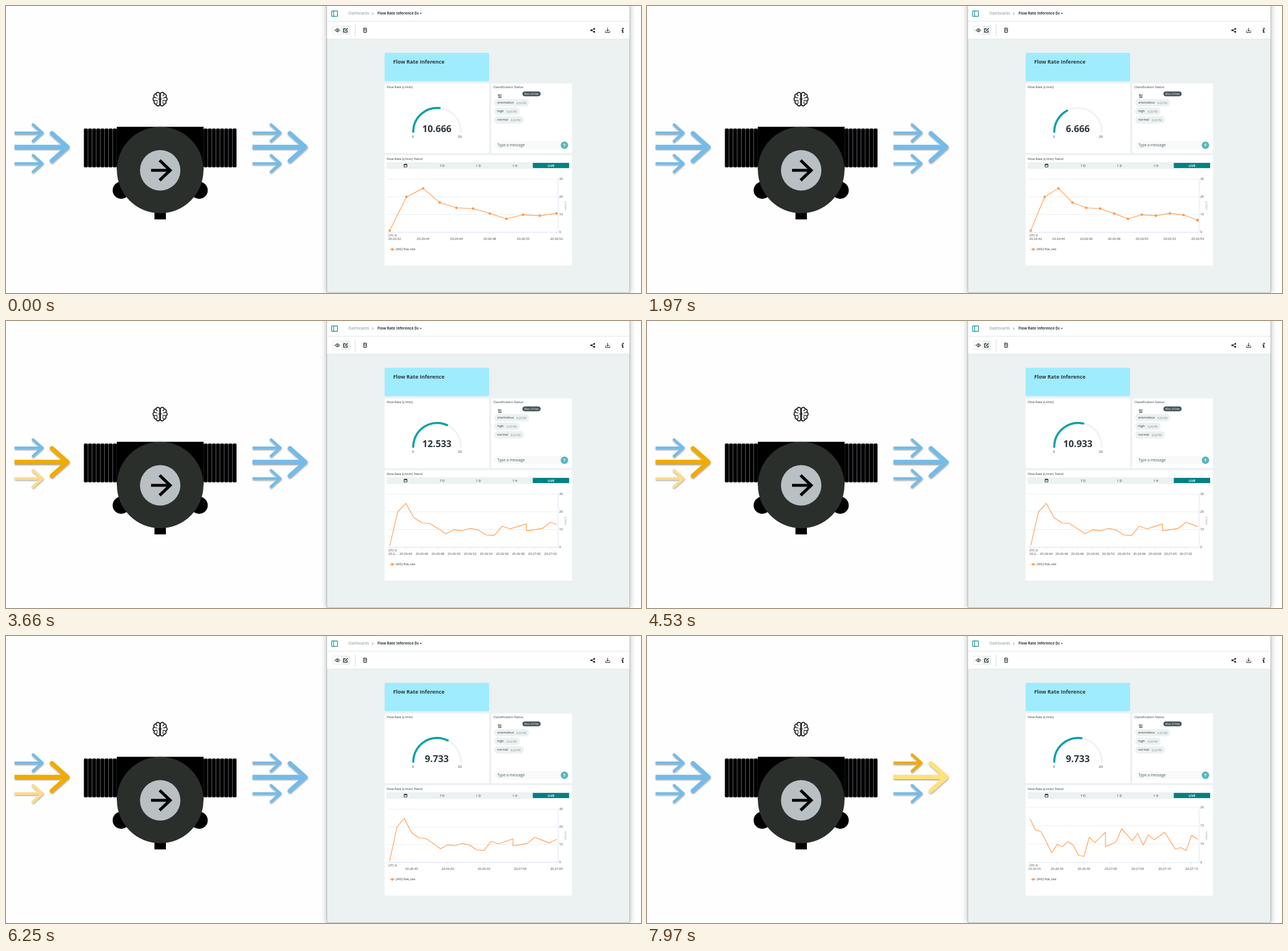
An HTML page for the animation above (8 s loop, 1112 px wide and 503 px high).

```html
<!DOCTYPE html>
<html lang="en">
<head>
<meta charset="utf-8">
<title>Flow rate dashboard</title>
<style>
html, body { margin: 0; width: 100%; height: 100%; overflow: hidden; background: #fefefe; }
svg { display: block; width: 100vw; height: 100vh; }
text { font-family: "Open Sans", "Noto Sans", sans-serif; font-size: 5.7px; fill: #2c353a; }
.line { fill: none; stroke: #111; stroke-linecap: round; stroke-linejoin: round; }
.mid { text-anchor: middle; }
.bold { font-weight: 700; }
.tick { font-size: 5.6px; fill: #444; }
.time { font-size: 4.6px; fill: #7f8c8d; }
</style>
</head>
<body>
<svg viewBox="0 0 1112 503" preserveAspectRatio="none">
  <defs>
    <filter id="soft" x="-20%" y="-20%" width="140%" height="150%">
      <feDropShadow dx="0.4" dy="1.6" stdDeviation="0.9" flood-color="#000" flood-opacity="0.4"/>
    </filter>
    <filter id="glow" x="-10%" y="-10%" width="120%" height="120%">
      <feGaussianBlur stdDeviation="6"/>
    </filter>
    <clipPath id="crumb"><rect x="650" y="6" width="72.3" height="16"/></clipPath>
    <clipPath id="plot"><rect x="668" y="296" width="299.5" height="104"/></clipPath>
  </defs>
  <rect width="1112" height="503" fill="#fefefe"/>

  <g id="flowIn"></g>
  <g id="flowOut" transform="translate(416.7 0)"></g>

  <!-- meter -->
  <g id="fins" stroke="#70757a" stroke-width="0.5"></g>
  <rect x="194" y="211.7" width="152" height="76"/>
  <circle cx="201.7" cy="323" r="15"/>
  <circle cx="338.3" cy="323" r="15"/>
  <rect x="260" y="360" width="20" height="14"/>
  <circle cx="270" cy="287.5" r="75.8" fill="#2b2f2c"/>
  <circle cx="270" cy="288" r="35.4" fill="#b8c0c4"/>
  <path d="M254 288H287M269 270.3L287.5 288L269 305.5" fill="none" stroke="#000" stroke-width="5.2"/>

  <!-- brain -->
  <g class="line" stroke-width="1.7">
    <path id="lobe" d="M269.3 153.5C268 150.5 263.4 150.6 262.8 154.2C259.4 154 258 157.2 259.5 159.5C256.6 161.2 256.8 165.4 259.6 166.6C258.4 169.6 260.2 172 262.8 172C263.6 175.6 268 176.3 269.3 173.2Z"/>
    <use href="#lobe" transform="matrix(-1 0 0 1 539.6 0)"/>
    <path stroke-width="1.2" d="M262.8 154.2Q263 157 265.4 157.5M259.5 159.5Q261.5 161.5 264.5 161M259.6 166.6Q262 164.2 264.5 165.5V168M262.8 172Q263.5 169.5 266 169.8M276.8 154.2Q276.6 157 274.2 157.5M280 159.5Q278 161.5 275 161M280 166.6Q277.5 164.2 275 165.5V168M276.8 172Q276 169.5 273.6 169.8M266.5 163H273"/>
  </g>

  <!-- window -->
  <rect x="562" y="-20" width="530" height="525" rx="5" fill="#000" opacity="0.3" filter="url(#glow)"/>
  <rect x="561.8" y="-10" width="530.4" height="512.7" rx="3" fill="#ecf1f1" stroke="#a9b0b2" stroke-width="0.9"/>
  <path d="M562.3 0H1091.7V58H562.3Z" fill="#fff"/>
  <path d="M562.3 26.7H1091.7M562.3 58H1091.7" stroke="#d8dddd" stroke-width="0.8"/>
  <g fill="none" stroke="#0a8f94" stroke-width="1.2">
    <rect x="570.3" y="8.6" width="10.2" height="9.6" rx="0.8"/><path d="M573.7 8.6V18.2"/>
  </g>
  <text x="599.8" y="15.3" style="font-size:6.4px;fill:#7f8c8d">Dashboards</text>
  <path class="line" d="M641.2 11.4L643.2 13.3L641.2 15.2" style="stroke:#6f7b7d" stroke-width="0.8"/>
  <g clip-path="url(#crumb)"><text class="bold" x="650.6" y="15.3" style="font-size:6.4px">Flow Rate Inference Dash</text></g>
  <path d="M724.6 12.3H728.2L726.4 14.3Z" fill="#2c353a"/>

  <!-- toolbar -->
  <rect x="572.3" y="35" width="29.7" height="15" rx="1.5" fill="#ecf1f1" stroke="#dfe5e5" stroke-width="0.7"/>
  <rect x="573" y="35.6" width="14.4" height="13.8" rx="1" fill="#fff"/>
  <g class="line" stroke-width="1">
    <path d="M576.2 42.6Q580.4 36.8 584.7 42.6Q580.4 48.3 576.2 42.6Z"/>
    <circle cx="580.4" cy="42.6" r="1.3"/>
    <path d="M594.3 39.8H591.2V46H597.3V43.2M594 43.4L597.8 39.5" stroke-width="1.2"/>
    <rect x="626.4" y="38.8" width="5" height="7.6" rx="0.5"/>
    <path d="M628 40.8H630M628 42.6H630M628.7 44.6H629.2" stroke-width="0.8"/>
    <path d="M1030 40.2L1025.2 42.6L1030 45.2"/>
    <path d="M1053.6 38.7V44M1051.3 42L1053.6 44.3L1055.9 42M1050 44V46.6H1057.2V44" stroke-width="0.9"/>
    <path d="M1078.4 42.2H1080.2L1079.4 46H1081" stroke-width="1.5"/>
  </g>
  <path d="M611.5 32V53.5" stroke="#cfd6d6" stroke-width="0.8"/>
  <g fill="#111">
    <circle cx="1030.1" cy="40.1" r="1.5"/><circle cx="1024.9" cy="42.6" r="1.5"/><circle cx="1030.1" cy="45.3" r="1.5"/>
    <circle cx="1080.5" cy="39.5" r="1.2"/>
  </g>

  <!-- cards -->
  <rect x="663" y="82" width="183" height="49.8" rx="2" fill="#9fecff"/>
  <text class="bold" x="678" y="101.2" style="font-size:9.1px">Flow Rate Inference</text>
  <g fill="#fff">
    <rect x="663" y="135.8" width="183" height="122" rx="1.5"/>
    <rect x="849.8" y="135.8" width="141.4" height="122" rx="1.5"/>
    <rect x="663" y="261.5" width="328.2" height="193.5" rx="1.5"/>
  </g>
  <text x="666.7" y="143.9">Flow Rate (L/min)</text>
  <text x="853.3" y="143.9">Classification Status</text>
  <text x="666.7" y="269.6">Flow Rate (L/min) Trend</text>

  <!-- gauge -->
  <g fill="none" stroke-width="3.7" stroke-linecap="round">
    <path d="M713.2 220.5A41.8 41.8 0 0 1 796.8 220.5" stroke="#f2f3f4"/>
    <path id="arc" stroke="#0ca1a6"/>
  </g>
  <text id="value" class="mid bold" x="754.5" y="220.8" style="font-size:16.3px"></text>
  <text class="mid" x="712.8" y="231.2" style="font-size:6px">0</text>
  <text class="mid" x="794.8" y="231.2" style="font-size:6px">20</text>

  <!-- chat -->
  <path class="line" d="M862.5 155.3H864.2V157.2H862.5ZM865.7 155.3H867.3M865.7 157.2H867.3M862.3 159H867.3M862.3 160.6H867.3" stroke-width="0.7"/>
  <rect x="904.3" y="149.8" width="32" height="8.4" rx="4.2" fill="#46545a"/>
  <text class="mid" x="920.2" y="155.7" style="font-size:4.6px;fill:#fff">Mon 24 Feb</text>
  <g id="chat"></g>
  <rect x="854.5" y="236.5" width="132.5" height="15" rx="7.5" fill="#f8fafa"/>
  <text x="860.7" y="246.3" style="font-size:6.45px;fill:#4e5b61">Type a message</text>
  <circle cx="977.9" cy="244" r="6.5" fill="#57b6ba"/>
  <path class="line" d="M977.9 246.5V241.8M975.9 243.6L977.9 241.6L979.9 243.6" style="stroke:#fff" stroke-width="0.9"/>

  <!-- range tabs -->
  <rect x="666.5" y="273.8" width="320.5" height="11.6" rx="1" fill="#ecf1f1"/>
  <rect x="922.5" y="275" width="63.6" height="9" rx="0.8" fill="#008184"/>
  <path class="line" d="M697.4 277.5H702.2V282.2H697.4ZM697.4 278.7H702.2M698.6 276.6V277.5M701 276.6V277.5" stroke-width="0.8"/>
  <text class="mid" x="763.6" y="281.7">7 D</text>
  <text class="mid" x="827.3" y="281.7">1 D</text>
  <text class="mid" x="890.9" y="281.7">1 H</text>
  <text class="mid bold" x="954.6" y="281.6" style="font-size:5.6px;fill:#fff">LIVE</text>

  <!-- chart -->
  <g id="chart"></g>
  <text class="tick" x="669.3" y="403.7" style="font-size:5.4px">UTC-6</text>
  <text class="mid" transform="translate(977.9 350) rotate(90)" style="fill:#999">L/min</text>
  <path d="M672.3 426.5H680.7" stroke="#ff9a49" stroke-width="1.1"/>
  <circle cx="676.5" cy="426.5" r="2.2" fill="#ff9a49"/>
  <text x="682.6" y="428.3" style="font-size:4.8px">[AVG] flow_rate</text>
</svg>
<script>
const LOOP = 8000, ANIM = 480, CUT_A = 2410, CUT_B = 7300;
const LEFT = 672, RIGHT = 964, ORANGE = '#ff9a49';
const BLUE = '#74bbe8', AMBER = '#f0ab00', SAND = '#fedc8a', LEMON = '#ffe27a';
const $ = id => document.getElementById(id);
const lerp = (a, b, p) => a + (b - a) * p;

// One reading per second from 20:26:42; second 59 was reported twice.
const readings = [0.933, 20, 24.8, 16.8, 13.8, 13.4, 10.6, 7.6, 9.9, 9.333, 10.666, 9.733,
  6.933, 6.666, 11.866, 10.4, 11.8, 13.2, 9.333, 9.9, 10.666, 14.133, 12.533, 10.933, 12.933,
  9.733, 12.533, 11.2, 12.133, 13.2, 10.933, 8.6, 9.066, 8.266, 12.4, 11.466, 9.733]
  .map((v, i) => ({ t: 42 + i - (i > 17), v }));
const valueAt = t => readings.filter(r => r.t === t).pop().v;

// shown from, animation start, second that arrives
const steps = [[0, -900, 52], [70, 70, 53], [1000, 1000, 54], [1970, 1970, 55],
  [CUT_A, 2370, 62], [3340, 3340, 63], [4290, 4290, 64], [5260, 5260, 65],
  [6250, 6250, 66], [7190, 7190, 67], [CUT_B, 7060, 76], [7870, 7870, 77]];

const clock = t => `20:${t < 60 ? 26 : 27}:${String(t % 60).padStart(2, '0')}`;
const xIn = (t, [lo, hi]) => LEFT + (t - lo) / (hi - lo) * (RIGHT - LEFT);

function arrow(tail, tip, y, reach, width, color) {
  return `<g filter="url(#soft)" fill="none" stroke="${color}" stroke-width="${width}">` +
    `<path d="M${tail} ${y}H${tip - 1}"/><path stroke-linecap="round" stroke-linejoin="round" ` +
    `d="M${tip - reach} ${y - reach * 0.89}L${tip} ${y}L${tip - reach} ${y + reach * 0.89}"/></g>`;
}

function arrows(id, top, big, low) {
  const key = top + big + low, group = $(id);
  if (group.dataset.key === key) return;
  group.dataset.key = key;
  group.innerHTML = arrow(15, 63.5, 222.3, 16, 4.7, top) + arrow(15, 63.5, 276, 16, 4.7, low) +
    arrow(15, 107.5, 247.2, 27, 7.7, big);
}

function drawTicks(step, from, to, p, end) {
  const gap = end < 65 ? 2 : 5, max = lerp(from[1], to[1], p) + 0.001;
  let out = '';
  for (let t = Math.ceil(from[0] / gap) * gap; t <= max; t += gap) {
    const x = lerp(xIn(t, from), xIn(t, to), p);
    const place = range => t < range[0] ? xIn(t, range) : Math.max(680.5, xIn(t, range));
    const fade = t < to[0] ? 1 - p : 1;
    if (fade <= 0) continue;
    const short = t === 42 && end > 60;
    out += `<path d="M${x} 396.5V401" stroke="#ccd6eb" stroke-width="0.6" opacity="${fade}"/>` +
      (short ? '<text class="tick" x="669.8" y="410">20:2…</text>'
        : `<text class="tick mid" x="${lerp(place(from), place(to), p)}" y="410" opacity="${fade}">${clock(t)}</text>`);
  }
  return out;
}

function drawChart(end, p) {
  const late = end >= 76;
  const from = [late ? 45 : 42, end - 1], to = [end > 76 ? 46 : from[0], end];
  const y = v => late ? 397 - (v - 5) * 6.46 : 396.5 - v * 3.1;
  let out = '';
  for (const v of late ? [5, 10, 15, 20] : [0, 10, 20, 30]) {
    const base = v === (late ? 5 : 0);
    out += `<path d="M668 ${y(v)}H967" stroke="${base ? '#ccd6eb' : '#e4e6e8'}" stroke-width="0.7"/>` +
      `<text class="tick" x="968.7" y="${y(v) + 1.7}">${v}</text>`;
  }
  out += '<path d="M967 303V397" stroke="#ccd6eb" stroke-width="0.7"/>' + drawTicks(2, from, to, p, end);

  const pts = readings.filter(r => r.t >= from[0] && r.t < end)
    .map(r => [lerp(xIn(r.t, from), xIn(r.t, to), p), y(r.v)]);
  const last = valueAt(end);
  const tip = [RIGHT, lerp(y(valueAt(end - 1)), y(last), p)];
  out += `<polyline clip-path="url(#plot)" points="${[...pts, tip].join(' ')}" fill="none" ` +
    `stroke="${ORANGE}" stroke-width="1.15" stroke-linejoin="round" stroke-linecap="round"/>`;
  if (end < 60) {
    for (const [cx, cy] of [...pts, [RIGHT, y(last)]])
      out += `<circle cx="${cx}" cy="${cy}" r="2.2" fill="${ORANGE}"/>`;
  }
  $('chart').innerHTML = out;
}

function drawGauge(end, p) {
  const v = lerp(valueAt(end - 1), valueAt(end), p), a = v / 20 * Math.PI;
  $('arc').setAttribute('d', `M713.2 220.5A41.8 41.8 0 0 1 ${755 - 41.8 * Math.cos(a)} ${220.5 - 41.8 * Math.sin(a)}`);
  $('value').textContent = valueAt(end).toFixed(3);
}

function draw(time) {
  const [, start, end] = steps.filter(s => s[0] <= time).pop();
  const k = Math.min(1, Math.max(0, (time - start) / ANIM));
  drawChart(end, (1 - Math.cos(Math.PI * k)) / 2);
  drawGauge(end, Math.sin(Math.PI / 2 * k));
  const inside = time >= CUT_A && time < CUT_B, after = time >= CUT_B;
  arrows('flowIn', BLUE, inside ? AMBER : BLUE, inside ? SAND : BLUE);
  arrows('flowOut', after ? AMBER : BLUE, after ? LEMON : BLUE, BLUE);
}

for (const left of [136.4, 346])
  for (let i = 0; i < 8; i++)
    $('fins').innerHTML += `<rect x="${left + i * 7.23}" y="214.8" width="7.1" height="68" rx="2"/>`;

[['anomalous', 61, 894], ['high', 44.5, 877], ['normal', 52, 884]].forEach(([word, width, x], i) => {
  const y = 163 + i * 15;
  $('chat').innerHTML += `<rect x="855" y="${y}" width="${width}" height="13" rx="6" fill="#ecf1f1"/>` +
    `<text x="860.3" y="${y + 8.2}" style="font-size:5.6px">${word}</text>` +
    `<text class="time" x="${x}" y="${y + 9}">8:26 PM</text>`;
});

function frame() {
  draw(performance.now() % LOOP);
  requestAnimationFrame(frame);
}
frame();
</script>
</body>
</html>
```
